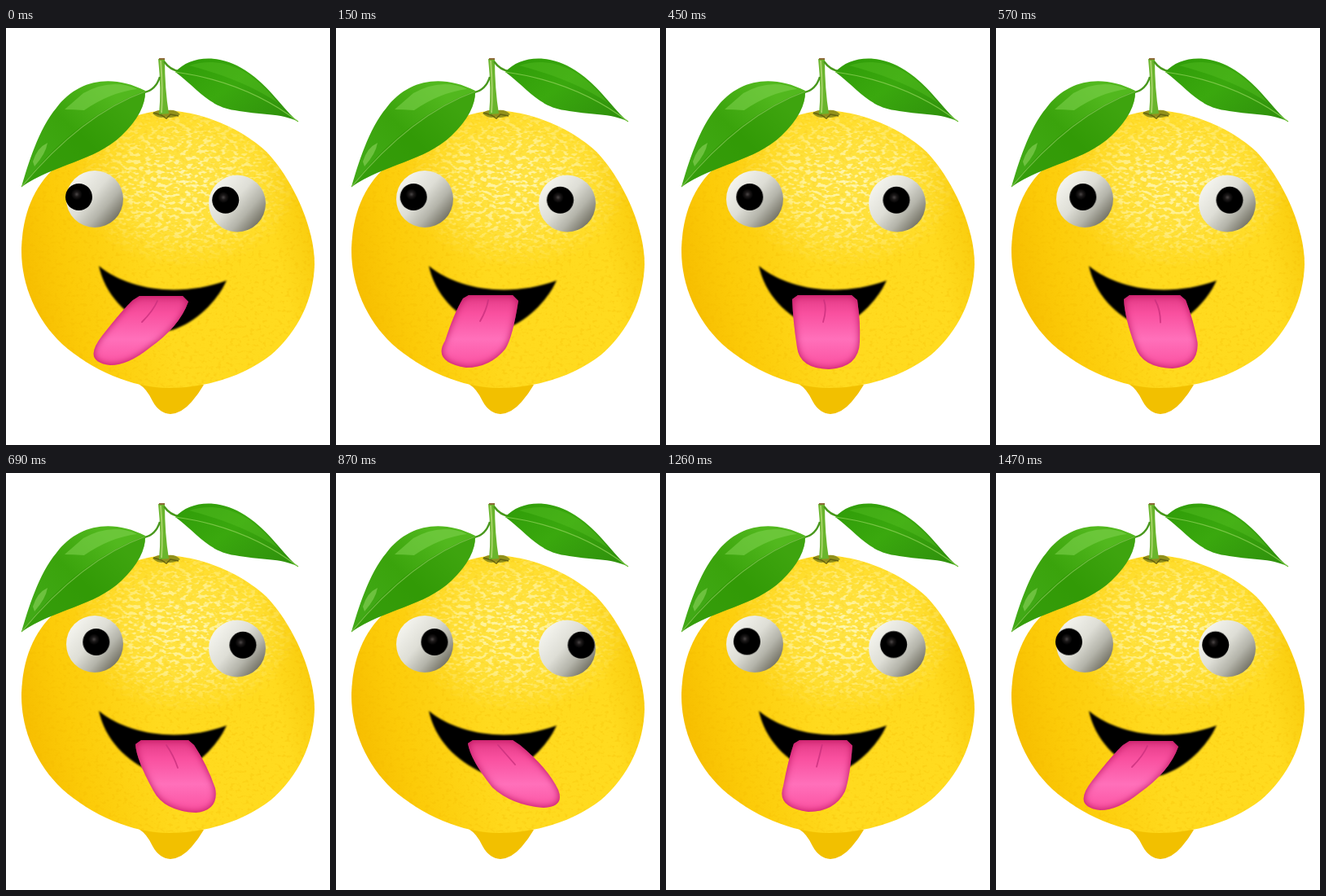
Animation of 398 by 512 pixels, one loop 1.5 s. Source, as an HTML page:

```html
<!DOCTYPE html>
<html lang="en">
<head>
<meta charset="utf-8">
<title>Silly lemon</title>
<style>
html, body { margin: 0; width: 100%; height: 100%; overflow: hidden; background: #fff; }
svg { position: absolute; left: 0; top: 0; width: 398px; height: 512px; }
.face { will-change: transform; }

/* tongue poses, far left to far right */
.tongue {
  --left: path("M156 334Q143 346 118 378Q93 410 128 414Q150 414 176 393Q213 367 224 336L217 329L164 329Z");
  --halfleft: path("M156 332Q145 350 134 384Q118 410 160 417Q189 417 208 394Q217 380 224 335L217 328L163 328Z");
  --down: path("M155 333Q156 360 161 392Q164 418 200 419Q237 417 238 385Q239 362 235 334L228 328L162 328Z");
  --short: path("M159 333Q160 358 164 386Q169 413 205 414Q243 414 243 386Q244 360 239 334L232 328L166 328Z");
  --halfright: path("M159 333Q160 352 181 390Q194 415 233 417Q262 414 257 387Q247 358 231 334L224 328L166 328Z");
  --right: path("M162 332Q165 352 192 386Q216 408 255 411Q281 410 273 389Q260 362 226 334L217 328L168 328Z");
  animation: wag 1.5s infinite;
}
.pupil { animation: look 1.5s infinite; }
.crease { animation: crease 1.5s infinite; }

/* every leg advances in 30 ms steps */
@keyframes look {
  0% { transform: translate(0, 0); animation-timing-function: steps(5); }
  10% { transform: translate(5.7px, 0); animation-timing-function: steps(10); }
  30% { transform: translate(13.3px, 0); animation-timing-function: steps(8); }
  46% { transform: translate(21.3px, 0); animation-timing-function: steps(6); }
  58% { transform: translate(31.5px, 0); animation-timing-function: steps(7); }
  72% { transform: translate(18.3px, -1px); animation-timing-function: steps(9); }
  90% { transform: translate(5.7px, -.5px); animation-timing-function: steps(4); }
  98%, 100% { transform: translate(0, -.3px); }
}
@keyframes wag {
  0% { d: var(--left); animation-timing-function: steps(5); }
  10% { d: var(--halfleft); animation-timing-function: steps(10); }
  30% { d: var(--down); animation-timing-function: steps(8); }
  46% { d: var(--halfright); animation-timing-function: steps(6); }
  58% { d: var(--right); animation-timing-function: steps(5); }
  68% { d: var(--halfright); animation-timing-function: steps(2); }
  72% { d: var(--short); animation-timing-function: steps(9); }
  90% { d: var(--halfleft); animation-timing-function: steps(4); }
  98%, 100% { d: var(--left); }
}
@keyframes crease {
  0% { d: path("M186 335Q181 347 167 361"); animation-timing-function: steps(5); }
  10% { d: path("M187 334Q185 346 177 360"); animation-timing-function: steps(10); }
  30% { d: path("M194 334Q198 345 193 361"); animation-timing-function: steps(8); }
  46% { d: path("M197 334Q206 347 211 362"); animation-timing-function: steps(6); }
  58% { d: path("M199 334Q206 342 220 358"); animation-timing-function: steps(7); }
  72% { d: path("M201 334Q197 346 201 362"); animation-timing-function: steps(9); }
  90% { d: path("M187 334Q185 346 177 360"); animation-timing-function: steps(4); }
  98%, 100% { d: path("M186 335Q181 347 167 361"); }
}
</style>
</head>
<body>
<svg viewBox="0 0 398 512">
  <defs>
    <linearGradient id="peel" x1="0" y1=".62" x2="1" y2=".4">
      <stop offset="0" stop-color="#f6bd00"/>
      <stop offset=".16" stop-color="#fccb08"/>
      <stop offset=".45" stop-color="#ffda1e"/>
      <stop offset=".85" stop-color="#ffdb1f"/>
      <stop offset="1" stop-color="#f9cb0c"/>
    </linearGradient>
    <radialGradient id="glow">
      <stop offset="0" stop-color="#fff"/>
      <stop offset=".55" stop-color="#aaa"/>
      <stop offset="1" stop-color="#000"/>
    </radialGradient>
    <linearGradient id="leafL" x1=".1" y1=".8" x2=".8" y2=".2">
      <stop offset="0" stop-color="#41a916"/>
      <stop offset=".5" stop-color="#3aa30c"/>
      <stop offset="1" stop-color="#52b81e"/>
    </linearGradient>
    <linearGradient id="leafR" x2="1" y2=".7">
      <stop offset="0" stop-color="#2f9c08"/>
      <stop offset=".5" stop-color="#3aa80e"/>
      <stop offset="1" stop-color="#30930c"/>
    </linearGradient>
    <filter id="pores" x="0" y="0" width="1" height="1" color-interpolation-filters="sRGB">
      <feTurbulence type="fractalNoise" baseFrequency=".14 .24" numOctaves="2" seed="7"/>
      <feColorMatrix values="0 0 0 0 1  0 0 0 0 .97  0 0 0 0 .7  7 0 0 0 -3.5"/>
    </filter>
    <filter id="dimples" x="0" y="0" width="1" height="1" color-interpolation-filters="sRGB">
      <feTurbulence type="fractalNoise" baseFrequency=".2 .26" numOctaves="2" seed="3"/>
      <feColorMatrix values="0 0 0 0 .95  0 0 0 0 .72  0 0 0 0 0  5 0 0 0 -2.75"/>
    </filter>
    <mask id="shine"><ellipse cx="222" cy="190" rx="140" ry="105" fill="url(#glow)"/></mask>
    <clipPath id="body"><use href="#lemon"/></clipPath>
  </defs>

  <path d="M163 437Q173 443 180 458Q188 473 202 474Q216 473 228 459Q236 450 243 438Z" fill="#f2c000"/>
  <path id="lemon" fill="url(#peel)" d="M197 101C240 103 288 122 320 152C354 188 379 246 379 290C378 333 359 372 326 401C293 427 247 442 200 442C155 442 105 420 69 388C37 358 18 314 19 270C21 222 38 186 72 162C106 137 145 103 197 101Z"/>
  <g clip-path="url(#body)">
    <rect width="398" height="445" filter="url(#dimples)" opacity=".25"/>
    <g mask="url(#shine)">
      <rect x="80" y="85" width="290" height="215" fill="#fff07c" opacity=".4"/>
      <rect x="80" y="85" width="290" height="215" filter="url(#pores)"/>
    </g>
  </g>

  <path d="M180 105Q186 99 194 102Q207 98 214 106Q205 112 195 109Q188 112 180 105Z" fill="#92911c"/>
  <path d="M181 104L191 107L197 111L202 106L212 108" fill="none" stroke="#65630f" stroke-width="1.5"/>
  <path d="M187 38L195 37Q195 75 200 105L188 106Q191 75 187 38Z" fill="#69b52d"/>
  <path d="M190 40Q193 76 191 104" fill="none" stroke="#a4d166" stroke-width="2"/>
  <path d="M188 38L195 38" stroke="#8c6a37" stroke-width="2"/>
  <path d="M170 79Q184 76 189 60M194 41Q202 52 213 53" fill="none" stroke="#48981c" stroke-width="2.5"/>

  <path d="M19 195C27 168 40 124 62 98C88 63 130 56 171 77Q172 103 142 132C108 164 60 167 19 195Z" fill="url(#leafL)"/>
  <path d="M19 195C62 138 112 100 171 77Q172 103 142 132C108 164 60 167 19 195Z" fill="#2a9100" opacity=".5"/>
  <path d="M95 80Q130 61 161 75Q128 79 96 101Q83 100 72 100Z" fill="#7cd04c" opacity=".6"/>
  <path d="M33 164Q38 147 51 141Q49 154 35 170Z" fill="#8cd25c" opacity=".6"/>
  <path d="M171 78Q93 106 19 195" fill="none" stroke="#73bd45" stroke-width="1.2"/>

  <path d="M208 54C226 34 262 31 294 52C326 73 339 99 359 115C338 104 311 107 281 101C249 96 238 77 208 54Z" fill="url(#leafR)"/>
  <path d="M225 46Q263 34 298 57Q320 73 334 92Q293 64 225 46Z" fill="#5cc42a" opacity=".35"/>
  <path d="M208 54Q295 66 359 115" fill="none" stroke="#79c645" stroke-width="1.2"/>
</svg>

<svg class="face" viewBox="0 0 398 512">
  <defs>
    <linearGradient id="ball" x1=".1" y1=".25" x2=".85" y2=".9">
      <stop offset="0" stop-color="#f2f2ec"/>
      <stop offset=".4" stop-color="#deded6"/>
      <stop offset=".7" stop-color="#b4b4aa"/>
      <stop offset="1" stop-color="#716f62"/>
    </linearGradient>
    <radialGradient id="ink" cx=".42" cy=".4" r=".6">
      <stop offset="0" stop-color="#4c4848"/>
      <stop offset=".15" stop-color="#1d1a1a"/>
      <stop offset=".35" stop-color="#000"/>
    </radialGradient>
    <linearGradient id="pink" gradientUnits="userSpaceOnUse" x1="0" y1="328" x2="0" y2="418">
      <stop offset="0" stop-color="#e23a85"/>
      <stop offset=".25" stop-color="#f9509f"/>
      <stop offset=".6" stop-color="#ff70ba"/>
      <stop offset="1" stop-color="#fb4f9f"/>
    </linearGradient>
    <filter id="soft"><feGaussianBlur stdDeviation=".8"/></filter>
    <filter id="rim" x="-.1" y="-.1" width="1.2" height="1.2" color-interpolation-filters="sRGB">
      <feGaussianBlur in="SourceAlpha" stdDeviation="5"/>
      <feComposite in="SourceAlpha" operator="out" result="edge"/>
      <feFlood flood-color="#b8105c"/>
      <feComposite in2="edge" operator="in" result="shade"/>
      <feMerge><feMergeNode in="SourceGraphic"/><feMergeNode in="shade"/></feMerge>
    </filter>
  </defs>

  <circle cx="109" cy="210" r="35" fill="url(#ball)"/>
  <circle cx="284" cy="215.5" r="35" fill="url(#ball)"/>
  <circle class="pupil" cx="89.5" cy="207.5" r="16.5" fill="url(#ink)"/>
  <circle class="pupil" cx="269.7" cy="211.3" r="16.5" fill="url(#ink)"/>

  <path d="M114 292C150 322 214 331 271 310C259 336 234 361 204 371Q194 373 182 369C147 353 122 328 114 292Z" fill="#050400" filter="url(#soft)"/>
  <path class="tongue" fill="url(#pink)" filter="url(#rim)" d="M156 334Q143 346 118 378Q93 410 128 414Q150 414 176 393Q213 367 224 336L217 329L164 329Z"/>
  <path class="crease" fill="none" stroke="#c92f7d" stroke-width="1.8" stroke-linecap="round" opacity=".8" d="M186 335Q181 347 167 361"/>
</svg>
</body>
</html>
```
